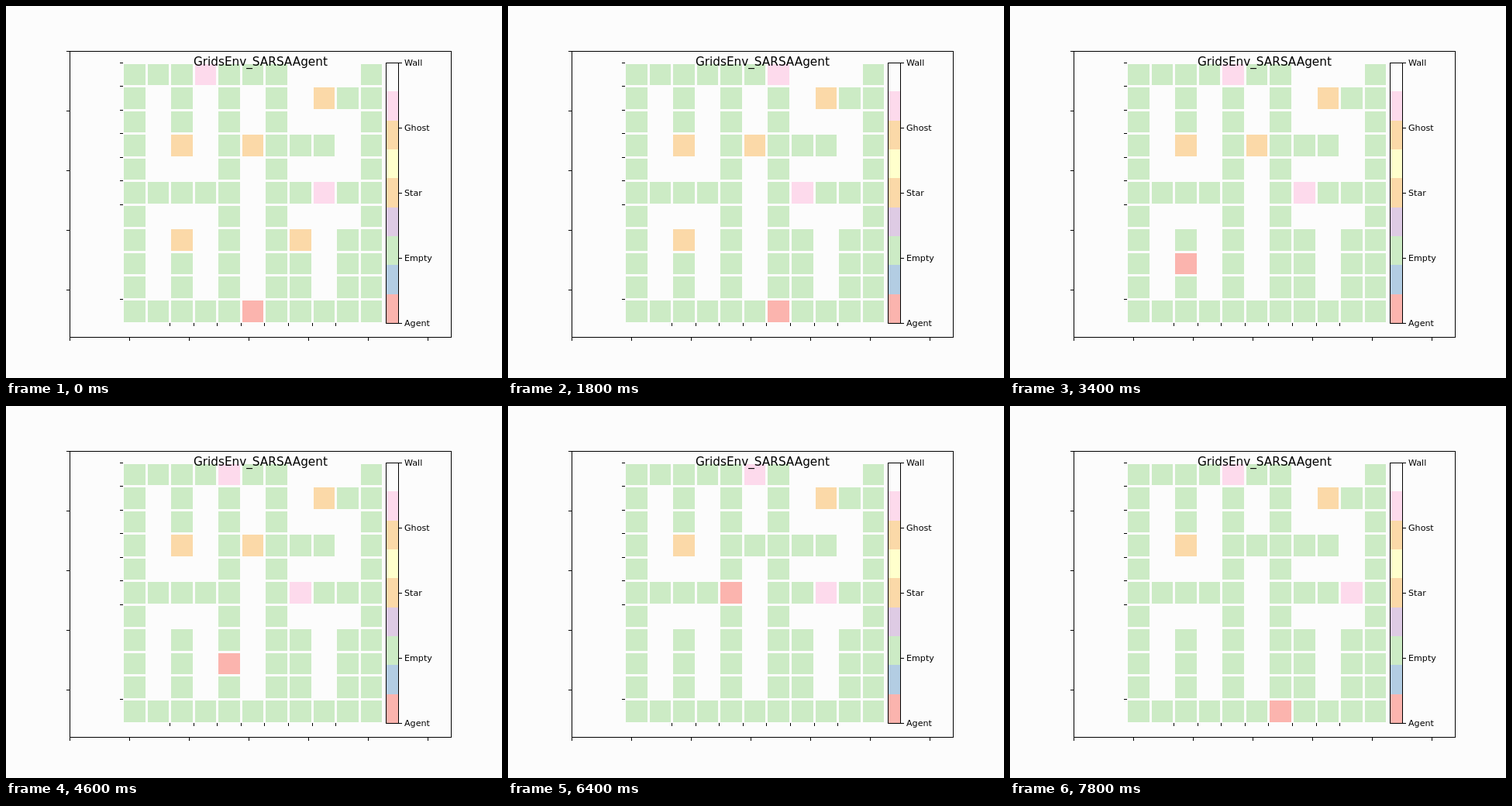
An HTML page with a canvas that plays this animation: 640x480 px, repeating every 8 s.

```html
<!DOCTYPE html>
<html lang="en">
<head>
<meta charset="utf-8">
<title>Grid world agent</title>
<style>
  html, body { margin: 0; width: 100%; height: 100%; overflow: hidden; background: #fcfcfc; }
  canvas { display: block; }
</style>
</head>
<body>
<canvas id="stage" width="640" height="480"></canvas>
<script>
const ctx = document.getElementById('stage').getContext('2d');
const STEP_MS = 200, STEPS = 40;
const PAPER = '#fcfcfc', INK = '#000';
const AGENT = '#fbb4ae', EMPTY = '#ccebc5', STAR = '#fbd9a8', GHOST = '#fddaec';

const maze = [
  '.......###.',
  '.#.#.#.#...',
  '.#.#.#.###.',
  '.#.#.....#.',
  '.###.#.###.',
  '.....#.....',
  '.###.#.###.',
  '.#.#.#..#..',
  '.#.#.#..#..',
  '.#.#.#..#..',
  '...........'
];

// Each star vanishes once the agent has reached it.
const stars = [[1, 8], [3, 2], [3, 5], [7, 2], [7, 7]];

// Column of each ghost at every step; a ghost never leaves its row.
const ghosts = [
  { row: 0, cols: '3456565656' + '5654343434' + '3434343456' + '5656565434' },
  { row: 5, cols: '8987878787' + '8787878787' + '8787878989' + '8989898989' }
];

const directions = { U: [-1, 0], D: [1, 0], L: [0, -1], R: [0, 1] };
const agentPath = [[10, 5]];
for (const move of 'RRUUUDDDLLLLLUUUDDDRRUUUUUUURLDDDDDDDRR') {
  const [row, col] = agentPath[agentPath.length - 1];
  const [dRow, dCol] = directions[move];
  agentPath.push([row + dRow, col + dCol]);
}

const PITCH = 336 / 11;
const lineX = col => Math.floor(150.7 + PITCH * col);
const lineY = row => Math.floor(73 + PITCH * row);

function rect(x, y, w, h, color) {
  ctx.fillStyle = color;
  ctx.fillRect(x, y, w, h);
}

function cell(row, col, color) {
  const x = lineX(col) + 2, y = lineY(row) + 2;
  rect(x, y, lineX(col + 1) - 1 - x, lineY(row + 1) - 1 - y, color);
}

function outline(left, top, right, bottom) {
  ctx.strokeStyle = INK;
  ctx.lineWidth = 1;
  ctx.strokeRect(left + 0.5, top + 0.5, right - left, bottom - top);
}

function text(string, x, y, size, align) {
  ctx.font = `${size}px "DejaVu Sans", sans-serif`;
  ctx.textAlign = align;
  ctx.fillStyle = INK;
  ctx.fillText(string, x, y);
}

function drawAxes() {
  outline(82, 58, 574, 427);
  for (let i = 0; i < 7; i++) rect(82 + 77 * i, 428, 1, 4, INK);
  for (let i = 0; i < 5; i++) rect(78, 58 + 77 * i, 4, 1, INK);
  for (let col = 2; col < 10; col++) rect(lineX(col), 409, 1, 4, INK);
  for (const row of [0, 1, 2, 3, 4, 5, 6, 10]) rect(147, lineY(row), 4, 1, INK);
}

function drawColorbar() {
  const bands = [PAPER, GHOST, STAR, '#ffffcc', STAR, '#decbe4', EMPTY, '#b3cde3', AGENT];
  const edge = i => Math.round(73 + 336 / 9 * i);
  bands.forEach((color, i) => rect(490, edge(i), 17, edge(i + 1) - edge(i), color));
  outline(490, 73, 506, 409);
  ['Wall', 'Ghost', 'Star', 'Empty', 'Agent'].forEach((label, i) => {
    const y = 73 + 84 * i;
    rect(507, y, 4, 1, INK);
    text(label, 514, y + 4, 11.11, 'left');
  });
}

function draw(step) {
  rect(0, 0, 640, 480, PAPER);
  drawAxes();
  maze.forEach((line, row) => [...line].forEach((tile, col) => {
    if (tile === '.') cell(row, col, EMPTY);
  }));
  const visited = agentPath.slice(0, step + 1).map(String);
  for (const star of stars) {
    if (!visited.includes(String(star))) cell(...star, STAR);
  }
  for (const { row, cols } of ghosts) cell(row, +cols[step], GHOST);
  cell(...agentPath[step], AGENT);
  drawColorbar();
  text('GridsEnv_SARSAAgent', 328.4, 77, 15.28, 'center');
}

function tick() {
  draw(Math.floor(performance.now() / STEP_MS) % STEPS);
  requestAnimationFrame(tick);
}
tick();
</script>
</body>
</html>
```
